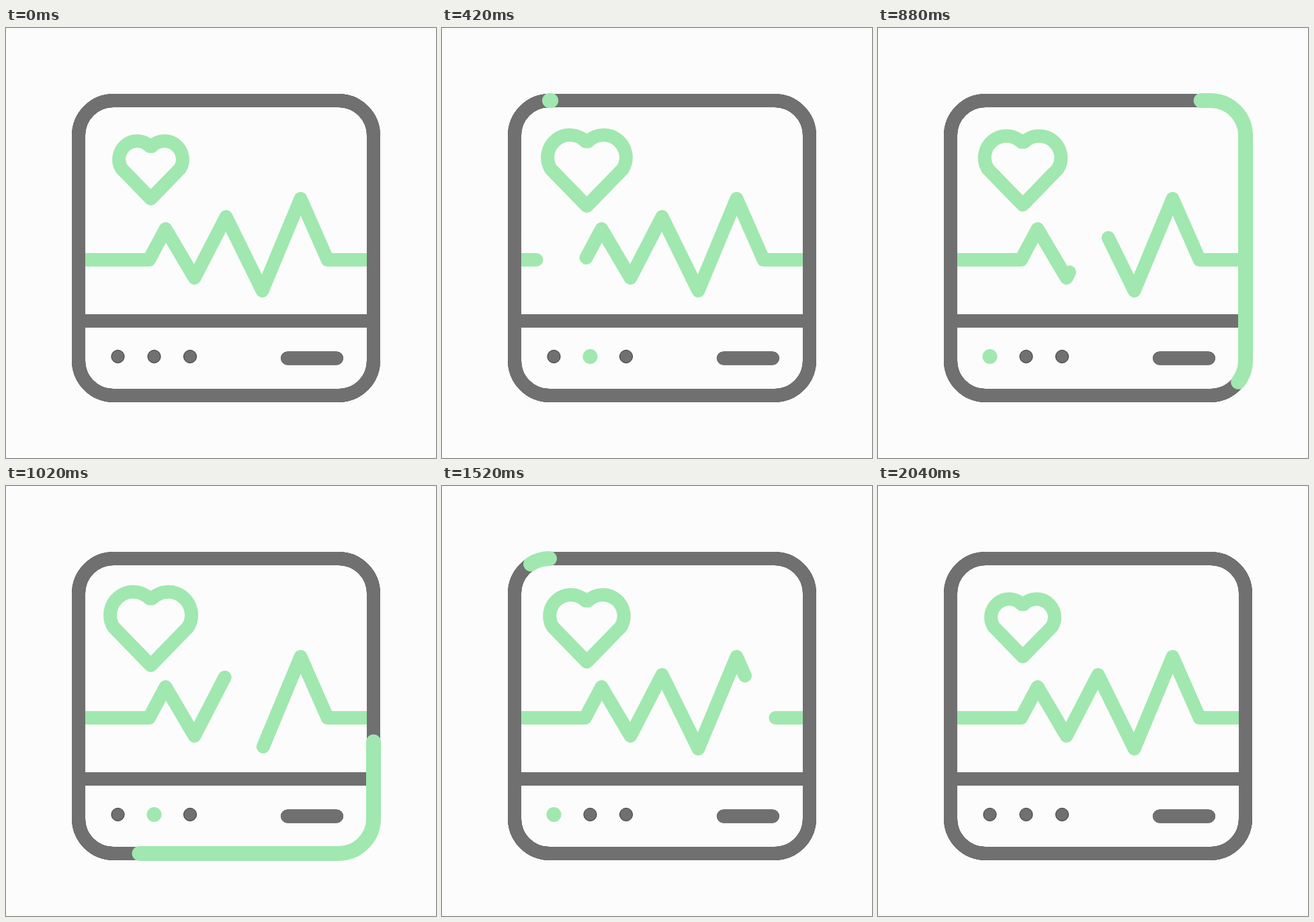
An HTML page for the animation above (2320 ms loop, 640 by 640 pixels).

```html
<!DOCTYPE html>
<html lang="en">
<head>
<meta charset="utf-8">
<title>Heart monitor</title>
<style>
  html, body { margin: 0; height: 100%; overflow: hidden; background: #fcfcfc; }
  svg { display: block; width: 640px; height: 640px; }
  path { fill: none; stroke-width: 20; stroke-linecap: round; stroke-linejoin: round; }
  .green { stroke: #a0e8af; }
  .grey { stroke: #707070; }
  .edge { stroke: #181818; }
  .grey.thin { stroke-width: 19.3; }
  #heart { vector-effect: non-scaling-stroke; }
  #ring { stroke-width: 22; }
  circle { fill: #707070; stroke: #181818; stroke-width: .8; }
  circle.on { fill: #a0e8af; stroke: #a0e8af; stroke-width: 2.8; }
</style>
</head>
<body>
<svg viewBox="0 0 640 640">
  <defs>
    <path id="box" pathLength="1" d="M160 108H495A52 52 0 0 1 547 160V495A52 52 0 0 1 495 547H160A52 52 0 0 1 108 495V160A52 52 0 0 1 160 108"/>
    <path id="wave" pathLength="1" d="M108 345H213L237.5 299L280.5 372L327.5 281L381.5 391L438.5 254L478.5 345H547"/>
    <path id="pill" d="M419 491.5H492"/>
  </defs>
  <path id="heart" class="green" d="M215.5 254L172.1 209.4A27 27 0 0 1 214 176L215.5 175L217 176A27 27 0 0 1 258.9 209.4Z"/>
  <use id="drawn" href="#wave" class="green"/>
  <use id="old" href="#wave" class="green"/>
  <path class="grey" d="M112 436H543"/>
  <use href="#box" class="edge"/>
  <use href="#box" class="grey thin"/>
  <use href="#pill" class="edge"/>
  <use href="#pill" class="grey thin"/>
  <circle cx="166.5" cy="489" r="9.6"/>
  <circle cx="220.5" cy="489" r="9.6"/>
  <circle cx="274" cy="489" r="9.6"/>
  <path id="ring" class="green" pathLength="1" d="M160 108H495A52 52 0 0 1 547 160V495A52 52 0 0 1 495 547H160A52 52 0 0 1 108 495V160A52 52 0 0 1 160 108"/>
</svg>
<script>
  const LOOP = 2320, BEAT = 2000 / 3, LAG = 200;
  const el = id => document.getElementById(id);
  const dots = document.querySelectorAll('circle');

  // Smooth ease from 0 to 1, clamped at both ends
  function ease(t, start, span) {
    const s = Math.min(1, Math.max(0, (t - start) / span));
    return s * s * (3 - 2 * s);
  }

  // Show only the part of a path between fractions a and b
  function trim(id, a, b) {
    const { style } = el(id);
    style.visibility = b > a ? 'visible' : 'hidden';
    style.strokeDasharray = `${b - a} 2`;
    style.strokeDashoffset = -a;
  }

  function draw(t) {
    trim('drawn', 0, ease(t, LAG, 1800));
    trim('old', ease(t, 0, 1800), 1);
    trim('ring', ease(t, 400 + LAG, 1000), ease(t, 400, 1000));

    const phase = t < 2000 ? t % BEAT / BEAT : 0;
    const size = 1 + 0.28 * ease(1 - Math.abs(2 * phase - 1), 0, 1);
    el('heart').setAttribute('transform', `translate(215.5 207) scale(${size}) translate(-215.5 -207)`);

    const step = Math.floor((t - 20) / (BEAT / 3));
    const lit = step >= 0 && step < 9 ? step % 3 : -1;
    dots.forEach((dot, i) => dot.classList.toggle('on', i === lit));
  }

  const begin = performance.now();
  function tick() {
    draw((performance.now() - begin) % LOOP);
    requestAnimationFrame(tick);
  }
  draw(0);
  requestAnimationFrame(tick);
</script>
</body>
</html>
```
